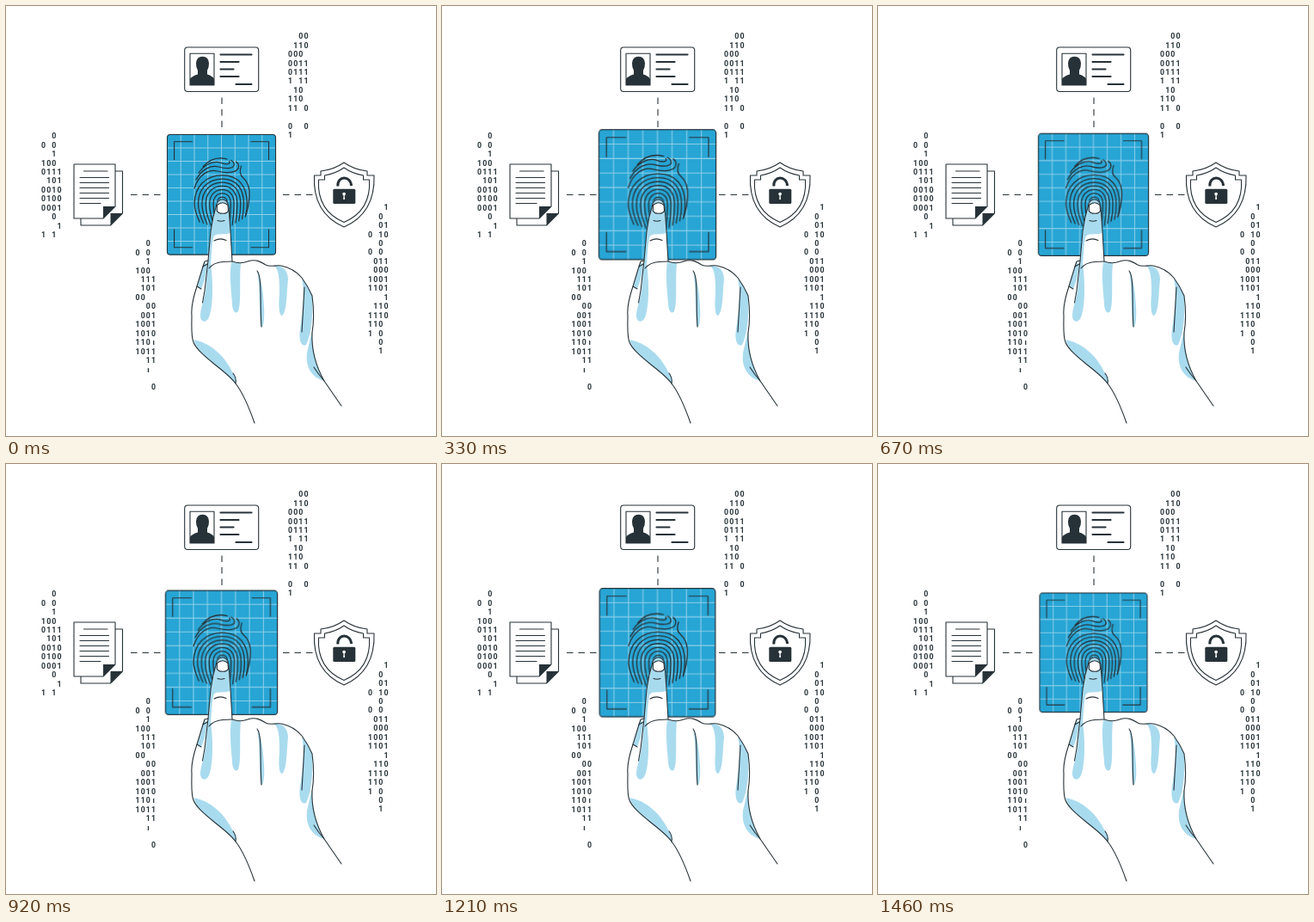
These frames come from a looping animation (500 by 500 pixels, 1500 ms). An HTML page:

```html
<!DOCTYPE html>
<html lang="en">
<head>
<meta charset="utf-8">
<title>Fingerprint access</title>
<style>
  html, body { margin: 0; width: 100%; height: 100%; overflow: hidden; background: #fff; }
  svg { display: block; width: 100vw; height: 100vh; }
  .line { fill: none; stroke: #263238; stroke-width: 1.1; stroke-linecap: round; stroke-linejoin: round; }
  .paper { fill: #fff; stroke: #263238; stroke-width: 1.1; stroke-linejoin: round; }
  .dark { fill: #263238; }
  .tint { fill: #a9dbee; }
  .bold { stroke-width: 2.2; }
  .print { stroke-width: 1.25; }
  .butt { stroke-linecap: butt; }
  .grid { fill: none; stroke: #8fd0e9; stroke-width: 1; }
  .bits { font: 600 8.8px Roboto, "Liberation Sans", sans-serif; font-stretch: 75%; fill: #263238; text-anchor: middle; }
  #panel { transform-origin: 250.5px 219.3px; animation: pulse 1.5s linear infinite; }
  @keyframes pulse {
    0%, 100% { transform: scale(1); }
    11.1% { transform: scale(1.038); }
    22% { transform: scale(1.081); }
    25% { transform: scale(1.086); }
    28% { transform: scale(1.081); }
    44.67% { transform: scale(1.017); }
    50% { transform: scale(1.004); }
    61.33% { transform: scale(1.033); }
    72% { transform: scale(1.081); }
    75% { transform: scale(1.086); }
    78% { transform: scale(1.081); }
    88.67% { transform: scale(1.033); }
    97.33% { transform: scale(.992); }
  }
</style>
</head>
<body>
<svg viewBox="0 0 500 500">
  <g id="bits" class="bits"></g>

  <path class="line butt" stroke-dasharray="7.5 6" d="M251 106.500V142M145 219.500H181M322 219.500H357.500"/>

  <g id="card">
    <rect class="paper" x="207.700" y="48" width="86" height="51.500" rx="3.500"/>
    <rect class="paper" x="214" y="55.300" width="28" height="36.700"/>
    <path class="dark" d="M214 92V85Q216 81.500 223 79.500V75Q220.800 71 221 66.500Q221.500 58.700 228.500 58.700Q235.500 58.700 236 66.500Q236.200 71 234 75V79.500Q240.500 81.500 242 85V92Z"/>
    <path class="line bold" d="M249.500 56.500H285.500M249.500 65H270.500M249.500 73.500H264.500M249.500 82H270.500M267.500 91H285.500"/>
  </g>

  <g id="docs">
    <path class="paper" d="M87 192H135.500V241L121.500 255H87Z"/>
    <path class="dark" d="M121.500 255V241H135.500Z"/>
    <path class="paper" d="M79 184H127V233L113 247H79Z"/>
    <path class="dark" d="M113 247V233H127Z"/>
    <path class="line" d="M90.500 192H118M86 199.500H119.500M86 205.500H119.500M86 211.500H119.500M86 217.500H119.500M86 223.500H119.500M86 229.500H110"/>
  </g>

  <g id="shield">
    <path class="paper" d="M393 182Q381 190.500 366 192V197H358.500C357 226 368 246 393 257C418 246 429 226 428 197H420V192Q405 190.500 393 182Z"/>
    <path class="paper" d="M393 188Q383 195 370.500 197V202H363.500C362 226 371 242 393 251.500C415 242 424 226 422.500 202H415.500V197Q403 195 393 188Z"/>
    <path class="line butt" style="stroke-width:3" d="M385.800 209.500C385 197 401 197 401.500 209"/>
    <rect class="dark" x="380.300" y="212.800" width="26" height="17.200" rx="1.500"/>
    <path fill="#fff" d="M391.300 219.200A1.900 1.900 0 1 1 394.900 219.200L393.700 220.500L394 225H392.200L392.500 220.500Z"/>
  </g>

  <g id="panel">
    <rect x="187.500" y="149.500" width="126" height="139.600" rx="3.500" fill="#27a5d5"/>
    <path id="grid" class="grid"/>
    <rect class="line" x="187.500" y="149.500" width="126" height="139.600" rx="3.500"/>
    <path class="line butt" d="M195.600 179V157.800H217M284.500 157.800H305.500V179M305.500 259.500V280.700H284.500M217 280.700H195.600V259.500"/>
    <path class="line print" d="M229 187C236 179 246 175 257 178M224 194C231 184 241 180 249 182C256 185 262 184 259.500 180.500M221 202C228 189 239 185 247 187C257 190 267 189 265 183C264.500 181 263 180 261.500 179.500M219 212C224 196 236 189 246 192C257 195 271 194 270.500 186C270.300 183 269 182 267.500 181M273.500 186C271 193 272 197 276 200C282 205 283.500 213 283 222C282.500 231 281 237 279 243"/>
    <path id="ridges" class="line print"/>
  </g>

  <g id="hand">
    <path fill="#fff" d="M289 485C282 465 274 448 267 439C262 432 252 424 243 417C232 408 221 399 218 391C215 384 216 370 216 360C215 350 219 335 222 326L229 303L231 297L235 296L238 262L241 245L244 234C245 222 258 222 259 234L261 262L263 297C271 300 276 299 281 297C290 294 296 297 302 301C307 304 313 301 320 302C330 304 338 309 344 316C349 323 353 330 356 337C358 352 358 368 356 380C355 400 361 420 370 436L390 465Z"/>
    <g class="tint">
      <path d="M244 233C245 222 258 222 259 234L260.500 264C252 267 244 263 241 269C239 280 239 292 238 300C241 320 241 350 236 362C233 369 226 368 226 360C227 347 232 340 233 320L235 296L238 262Z"/>
      <path d="M222 326L231 298L234 301L231 318L227 329Z"/>
      <path d="M262 298L273 299C271 320 274 345 270 355C267 359 263 355 263 345C261 325 260 310 262 298Z"/>
      <path d="M292 308C298 320 299 335 300 350C301 365 299 375 296.500 373C294 355 296 330 292 308Z"/>
      <path d="M312 302C323 301 328 309 328 318C326 335 327 355 321 360C317 360 317 345 318 335C318 320 318 308 312 302Z"/>
      <path d="M344 317Q352 327 356 337C357 355 356 380 349 394C343 397 340 388 342 375C345 355 348 335 344 317Z"/>
      <path d="M356 377L350 403C348 420 355 431 369 436C361 420 355 400 356 377Z"/>
      <path d="M218 388C239 392 255 408 264 427C269 432 268 437 267 439C262 432 252 424 243 417C232 408 221 399 218 388Z"/>
    </g>
    <path class="line" d="M289 485C282 465 274 448 267 439C262 432 252 424 243 417C232 408 221 399 218 391C215 384 216 370 216 360C215 350 219 335 222 326L229 303L231 297L235 296"/>
    <path class="line" d="M228.500 345L231 331L235 296L238 262L241 245L244 234C245 222 258 222 259 234L261 262L263 297C271 300 276 299 281 297C290 294 296 297 302 301C307 304 313 301 320 302C330 304 338 309 344 316C349 323 353 330 356 337C358 352 358 368 356 380C355 400 361 420 370 436L390 465"/>
    <path class="line" d="M222 326L227 329M229 303L234 300M236 305Q242 298 252 297.500L263 297M246 249.500Q250 251 254 249.500M242 273Q249 269 256 272.500M292 308C298 315 295 345 297 373M347 327L344 379M358 420Q363 428 370 436M264 427Q268 432 267 439"/>
    <path class="paper" d="M245.500 231.500Q252 226 258 231.500L258.500 238Q257.500 241.300 252 241.300Q246.500 241.300 245.300 238Z"/>
  </g>
</svg>
<script>
  const $ = id => document.getElementById(id);

  let grid = '';
  for (let i = 1; i < 8; i++) grid += `M${187.5 + i * 15.75} 149.5V289`;
  for (let i = 1; i < 9; i++) grid += `M187.5 ${149.5 + i * 15.51}H313.5`;
  $('grid').setAttribute('d', grid);

  // Nested arches around the fingertip
  let ridges = '';
  for (let i = 0; i < 7; i++) {
    const x = 251.5, wl = 6 + i * 4.4, wr = 6 + i * 3.8, top = 222 - i * 4.2;
    const l = x - wl, r = x + wr, low = 259 - i * 1.3, bend = top + (230 - top) * .4;
    ridges += `M${l + 6} ${low}Q${l} ${low - 14} ${l} 230C${l} ${bend} ${x - wl * .6} ${top} ${x} ${top}`
      + `S${r} ${bend} ${r} 230Q${r} ${low - 14} ${r - 2} ${low - i}`;
  }
  $('ridges').setAttribute('d', ridges);

  // Columns of bits: left, top, rows separated by "/"
  const blocks = [
    [43.5, 151, '  0/0 0/  1/100/0111/ 101/0010/0100/0001/  0/   1/1 1'],
    [330.5, 35, '  00/ 110/000/0011/0111/1 11/ 10/110/11 0//0  0/1'],
    [153, 276, '  0/0 0/  1/100/ 111/ 101/00/  00/ 001/1001/1010/110ı/1011/  11/  ı//   0'],
    [423.5, 234, '   1/  0/  01/0 10/  0/0 0/ 011/ 000/1001/1101/   1/ 110/1110/110/1 0/  0/  1']
  ];
  let bits = '';
  for (const [x, y, rows] of blocks)
    rows.split('/').forEach((row, j) => [...row].forEach((c, i) => {
      if (c !== ' ') bits += `<text x="${x + i * 6.2}" y="${y + 3.2 + j * 10.45}">${c}</text>`;
    }));
  $('bits').innerHTML = bits;
</script>
</body>
</html>
```
